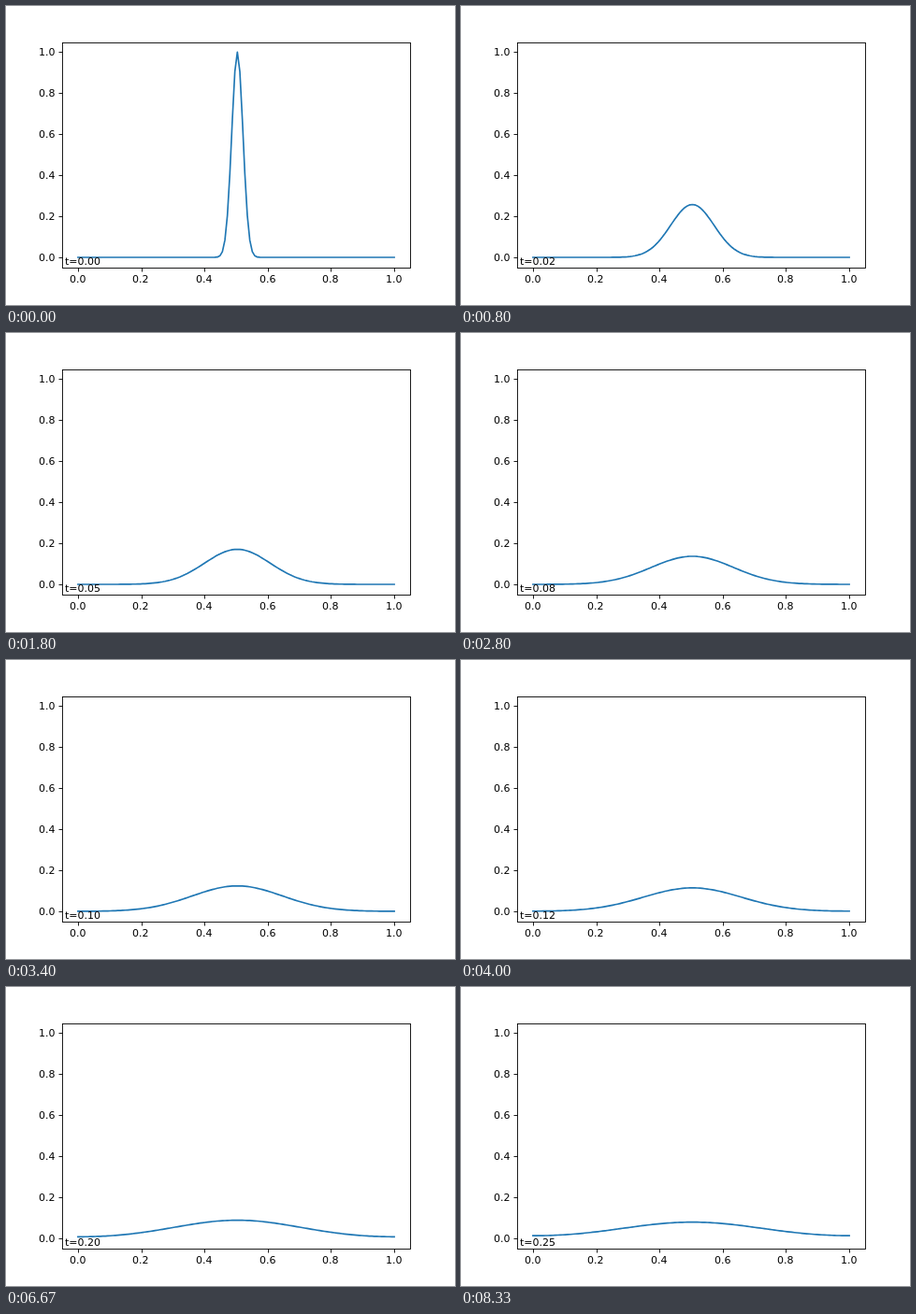
These frames come from a looping animation (480 by 320 pixels, 8.39 s). An HTML page with a canvas:

```html
<!DOCTYPE html>
<html lang="en">
<head>
<meta charset="utf-8">
<title>Diffusion of a Gaussian pulse</title>
<style>
  html, body { margin: 0; width: 100%; height: 100%; overflow: hidden; background: #fff; }
  canvas { display: block; width: 480px; height: 320px; }
</style>
</head>
<body>
<canvas id="stage" width="480" height="320"></canvas>
<script>
const ctx = document.getElementById('stage').getContext('2d');

const LOOP = 8390, DT = 0.002, DIFFUSION = 0.1, VARIANCE = 1 / 3200;
const POINTS = 128, CENTER = 64 / (POINTS - 1);
const LEFT = 60, RIGHT = 432, TOP = 38.4, BOTTOM = 280;
const PT = 80 / 72; // pixels per typographic point

// Both axes run from -0.05 to 1.05.
const toX = x => LEFT + (x + 0.05) / 1.1 * (RIGHT - LEFT);
const toY = y => BOTTOM - (y + 0.05) / 1.1 * (BOTTOM - TOP);
const crisp = v => Math.round(v) + 0.5;

// Heat kernel on a periodic unit interval.
function density(x, t) {
  const variance = VARIANCE + 2 * DIFFUSION * t;
  let sum = 0;
  for (let shift = -1; shift <= 1; shift++)
    sum += Math.exp(-((x - CENTER + shift) ** 2) / (2 * variance));
  return sum * Math.sqrt(VARIANCE / variance);
}

function line(x1, y1, x2, y2) {
  ctx.beginPath();
  ctx.moveTo(x1, y1);
  ctx.lineTo(x2, y2);
  ctx.stroke();
}

// Starts on a whole pixel; anchor is 0 for left, 0.5 for center, 1 for right.
function label(text, x, baseline, anchor) {
  const start = x - ctx.measureText(text).width * anchor;
  ctx.fillText(text, Math.floor(start), baseline);
}

function drawAxes() {
  ctx.strokeStyle = ctx.fillStyle = '#000';
  ctx.lineWidth = 0.8 * PT;
  ctx.lineCap = 'butt';
  ctx.lineJoin = 'miter';
  ctx.font = '11px "DejaVu Sans", sans-serif';
  const left = crisp(LEFT), top = Math.ceil(TOP) + 0.5, bottom = crisp(BOTTOM);
  ctx.strokeRect(left, top, crisp(RIGHT) - left, bottom - top);
  for (let i = 0; i <= 5; i++) {
    const text = (i / 5).toFixed(1), x = toX(i / 5), y = toY(i / 5);
    line(crisp(x), bottom, crisp(x), bottom + 4);
    line(left, crisp(y), left - 4, crisp(y));
    label(text, x, 296, 0.5);
    label(text, 53, Math.round(y) + 4, 1);
  }
}

function drawCurve(t) {
  ctx.strokeStyle = '#1f77b4';
  ctx.lineWidth = 1.5 * PT;
  ctx.lineCap = 'square';
  ctx.lineJoin = 'round';
  ctx.beginPath();
  for (let i = 0; i < POINTS; i++) {
    const x = i / (POINTS - 1);
    ctx.lineTo(toX(x), toY(density(x, t)));
  }
  ctx.stroke();
}

// Fifteen ticks a second, each rounded to 10 ms; the first state holds for two.
function stepAt(ms) {
  const tick = Math.ceil((Math.floor(ms / 10) + 0.5) * 3 / 20) - 1;
  return Math.max(0, tick - 1);
}

function draw(now) {
  const t = stepAt(now % LOOP) * DT;
  ctx.fillStyle = '#fff';
  ctx.fillRect(0, 0, 480, 320);
  drawCurve(t);
  drawAxes();
  label('t=' + t.toFixed(2), 63.7, 277, 0);
}

let start;
function animate(now) {
  start ??= now;
  draw(now - start);
  requestAnimationFrame(animate);
}
draw(0);
requestAnimationFrame(animate);
</script>
</body>
</html>
```
